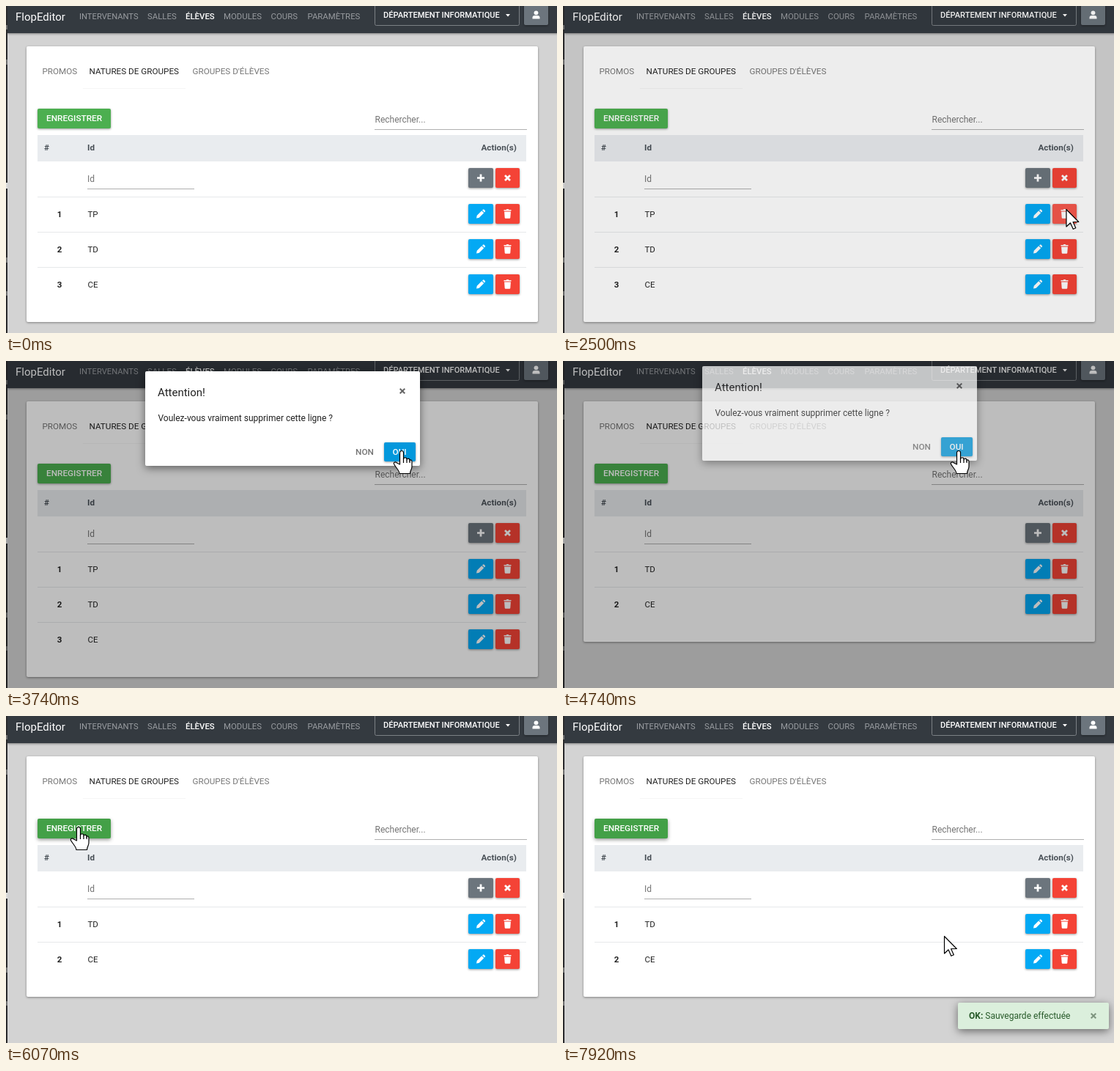
Animation, 752 px wide and 446 px high, one loop 7990 ms. Source, as an HTML page:

```html
<!DOCTYPE html>
<html lang="fr">
<head>
<meta charset="utf-8">
<title>FlopEditor</title>
<style>
html, body { margin: 0; width: 100%; height: 100%; overflow: hidden; background: #d3d3d3; }
svg { display: block; }
text { font: 12px Roboto, sans-serif; fill: #212121; white-space: pre; }
.brand { font-size: 15px; fill: #fff; }
.nav text { font-size: 11.4px; fill: #999ca0; }
.nav .on { fill: #fff; font-weight: 500; }
.nav .dept { font-size: 11.1px; fill: #fff; font-weight: 500; }
.tabs text { font-size: 11.7px; fill: #757575; }
.tabs .on { fill: #212121; }
.btn { font-size: 11.8px; font-weight: 500; fill: #fff; }
.head text { font-size: 11.7px; font-weight: 700; fill: #495057; }
.rows text { font-size: 11.5px; }
.rows .num { font-weight: 700; text-anchor: middle; }
.hint { fill: #757575; }
.title { font-size: 15px; }
.ok, .ok tspan { fill: #285b2a; }
.raised { filter: drop-shadow(0 1px 1.5px rgba(0,0,0,.4)); }
.high { filter: drop-shadow(0 3px 6px rgba(0,0,0,.5)); }
.icon { fill: #fff; }
.stroke { fill: none; stroke: #fff; stroke-width: 2.7; }
</style>
</head>
<body>
<svg width="752" height="446" viewBox="0 0 752 446">
  <defs>
    <path id="plus" class="stroke" d="M-5 0H5M0-5V5"/>
    <path id="times" class="stroke" d="M-3.5-3.5L3.5 3.5M-3.5 3.5L3.5-3.5"/>
    <path id="cross" fill="none" stroke-width="2" d="M-3.3-3.3L3.3 3.3M-3.3 3.3L3.3-3.3"/>
    <path id="pencil" class="icon" d="M-6 6L-5.3 2.3 1.2-4.2 4.2-1.2-2.3 5.3ZM2-5L3.3-6Q4-6.4 4.6-5.8L5.8-4.6Q6.4-4 6-3.3L5-2Z"/>
    <path id="trash" class="icon" d="M-5-5.5h3l1-1h2l1 1h3v1.6H-5zM-4.4-3h8.8l-.6 8.2q-.1 1-1.1 1h-5.4q-1 0-1.1-1z"/>
  </defs>

  <rect width="752" height="446" fill="#d3d3d3"/>
  <rect class="raised" x="2" y="-5" width="752" height="42" fill="#343a40"/>
  <g class="nav">
    <text class="brand" style="font-size:15px;fill:#fff" x="13" y="20">FlopEditor</text>
    <text x="100" y="18" style="font-size:11.2px">INTERVENANTS</text>
    <text x="193" y="18">SALLES</text>
    <text x="245" y="18" class="on">ÉLÈVES</text>
    <text x="297" y="18">MODULES</text>
    <text x="361.5" y="18">COURS</text>
    <text x="411.5" y="18">PARAMÈTRES</text>
    <rect x="503.5" y="-5" width="197" height="31.5" rx="2" fill="none" stroke="#7c8185"/>
    <text x="515" y="16" class="dept">DÉPARTEMENT INFORMATIQUE</text>
    <path d="M682 11h6l-3 3.5z" fill="#fff"/>
    <rect class="raised" x="707" y="-5" width="33" height="31" rx="2" fill="#6c757d"/>
    <g class="icon" transform="translate(723.5 12)">
      <circle cy="-2.7" r="2.9"/><path d="M-5 5.5V4q0-3 3-3h4q3 0 3 3v1.5z"/>
    </g>
  </g>

  <rect id="card" class="raised" x="28" y="55" width="698" height="376" rx="2" fill="#fff"/>
  <g class="tabs">
    <text x="49.5" y="93">PROMOS</text>
    <text x="113.5" y="93" class="on">NATURES DE GROUPES</text>
    <text x="254.5" y="93">GROUPES D'ÉLÈVES</text>
    <path d="M105 112.5H245" stroke="#f5f5f5"/>
  </g>
  <rect id="save" x="43" y="140" width="100" height="27" rx="2"/>
  <text class="btn" x="55" y="157">ENREGISTRER</text>
  <text class="hint" x="503.5" y="159">Rechercher...</text>
  <path d="M503 168.5H711M111 249.5H257" stroke="#b0b0b0"/>
  <rect x="43" y="176" width="667" height="36" fill="#e9ecef"/>
  <g class="head">
    <text x="52" y="197">#</text><text x="111" y="197">Id</text><text x="648.5" y="197">Action(s)</text>
  </g>
  <text class="hint" x="111" y="240">Id</text>
  <g id="rows" class="rows"></g>

  <g id="alert">
    <rect class="high" x="539" y="391" width="206" height="36" rx="2" fill="#dbefdc"/>
    <text class="ok" x="554" y="413"><tspan font-weight="700">OK:</tspan> Sauvegarde effectuée</text>
    <use href="#cross" x="724" y="409" stroke="#7d947e"/>
  </g>

  <path d="M1 0V446" stroke="#2b2b2d" stroke-width="2"/>
  <path d="M1 26v6M1 73v7M1 343v7M1 389v6" stroke="#707070" stroke-width="2"/>
  <path d="M1 241v8" stroke="#ddd" stroke-width="2"/>

  <rect id="backdrop" width="752" height="446"/>
  <g id="modal">
    <rect class="high" x="190" y="14" width="375" height="129" rx="2" fill="#fff"/>
    <text class="title" x="207" y="48">Attention!</text>
    <use href="#cross" x="541" y="41" stroke="#666"/>
    <text x="207.5" y="82">Voulez-vous vraiment supprimer cette ligne ?</text>
    <text class="btn" style="fill:#757575" x="477" y="128">NON</text>
    <rect id="yes" class="raised" x="516" y="111" width="43" height="26" rx="2"/>
    <text class="btn" x="527.5" y="128">OUI</text>
  </g>

  <g id="cursor" fill="#fff" stroke="#000" stroke-width="1.2" stroke-linejoin="round">
    <path id="arrow" d="M.5.5V24L6 18.8 9.8 27.3 13.3 25.8 9.6 17.5H17.3Z"/>
    <g id="hand">
      <path d="M-2.5 19V3a2.5 2.5 0 0 1 5 0V12c0-3 4.5-3 4.5 0v1c0-2.5 4-2.5 4 .5v1c0-2.5 3-2 3 1V22c0 4-2.5 5-2.5 9.5H-3c0-4-5-8-7.5-13c-1-2.5 2-3.5 4-1.5z"/>
      <path d="M2.5 11v6M7 13v4M11 14v3" fill="none"/>
    </g>
  </g>
</svg>
<script>
const LOOP = 7990;
const $ = id => document.getElementById(id);
const set = (id, attrs) => { for (const k in attrs) $(id).setAttribute(k, attrs[k]); };
const clamp = v => Math.min(1, Math.max(0, v));
const between = (t, a, b) => t >= a && t < b;
const ramp = (t, start, length) => clamp((t - start) / length);
const easeOut = p => 1 - (1 - p) ** 1.7;
const smooth = p => p * p * (3 - 2 * p);

const button = (x, y, w, color, icon, id = '') =>
  `<rect id="${id}" class="raised" x="${x}" y="${y}" width="${w}" height="27" rx="2" fill="${color}"/>
   <use href="#${icon}" x="${x + w / 2}" y="${y + 13.5}"/>`;

$('rows').innerHTML = button(631, 221, 34, '#6c757d', 'plus') + button(668, 221, 33, '#f44336', 'times') +
  [0, 1, 2].map(i => {
    const y = 260 + 48 * i;
    return `<g id="row${i}"><path d="M43 ${y + .5}H710" stroke="#e6e8ea"/>
      <text class="num" x="73" y="${y + 28}">${i + 1}</text><text id="name${i}" x="111.5" y="${y + 28}"></text>
      ${button(631, y + 10, 34, '#03a9f4', 'pencil', 'edit' + i)}${button(668, y + 10, 33, '#f44336', 'trash', 'del' + i)}</g>`;
  }).join('');

// Pointer stops: time, x, y
const path = [
  [330, 380, 450], [1170, 660, 296], [1240, 660, 292], [1700, 684, 277], [2420, 684, 277], [2560, 688, 277],
  [2860, 688, 277], [3220, 322, 108], [3280, 322, 110], [3720, 540, 122], [4880, 540, 122],
  [5370, 215, 157], [5640, 215, 157], [6050, 99, 151], [7700, 99, 151], [7920, 520, 300], [LOOP, 520, 300]
];

function pointerAt(t) {
  const i = path.findIndex(stop => stop[0] > t);
  if (i < 1) return [-50, -50];
  const [t0, x0, y0] = path[i - 1], [t1, x1, y1] = path[i];
  const p = smooth((t - t0) / (t1 - t0));
  return [x0 + (x1 - x0) * p, y0 + (y1 - y0) * p];
}

function draw(t) {
  const deleted = t >= 4660;
  const names = deleted ? ['TD', 'CE', ''] : ['TP', 'TD', 'CE'];
  names.forEach((name, i) => { $('name' + i).textContent = name; });
  set('row2', { visibility: deleted ? 'hidden' : 'visible' });
  set('card', { height: deleted ? 328 : 376 });

  const [x, y] = pointerAt(t);
  const hand = between(t, 1240, 2500) || between(t, 3640, 4860) || between(t, 5920, 7730);
  set('cursor', { transform: `translate(${x} ${y})` });
  set('hand', { visibility: hand ? 'visible' : 'hidden' });
  set('arrow', { visibility: hand ? 'hidden' : 'visible' });

  set('edit0', { fill: between(t, 1240, 1450) ? '#0397db' : '#03a9f4' });
  set('del0', { fill: between(t, 1450, 2900) ? '#f6584c' : '#f44336' });
  set('yes', { fill: between(t, 3640, 4860) ? '#0398dc' : '#03a9f4' });

  const pressed = between(t, 6340, 6690);
  const hover = t >= 5920;
  set('save', { fill: pressed ? '#3d9441' : hover ? '#43a047' : '#4caf50' });
  $('save').style.filter = `drop-shadow(0 ${hover ? 2 : 1}px ${pressed ? 4 : hover ? 2.5 : 1.5}px rgba(0,0,0,.4))`;

  const closing = t >= 4700;
  const slide = closing ? 1 - easeOut(ramp(t, 4700, 300)) : easeOut(ramp(t, 2640, 300));
  const fade = closing ? 1 - ramp(t, 4700, 150) : ramp(t, 2640, 140);
  set('modal', { opacity: fade, transform: `translate(0 ${-32 * (1 - slide)})` });
  set('backdrop', { opacity: .26 * (ramp(t, 2460, 150) - ramp(t, 5000, 150)) });
  set('alert', { visibility: t >= 7440 ? 'visible' : 'hidden' });
}

const start = performance.now();
function tick() {
  draw((performance.now() - start) % LOOP);
  requestAnimationFrame(tick);
}
tick();
</script>
</body>
</html>
```
